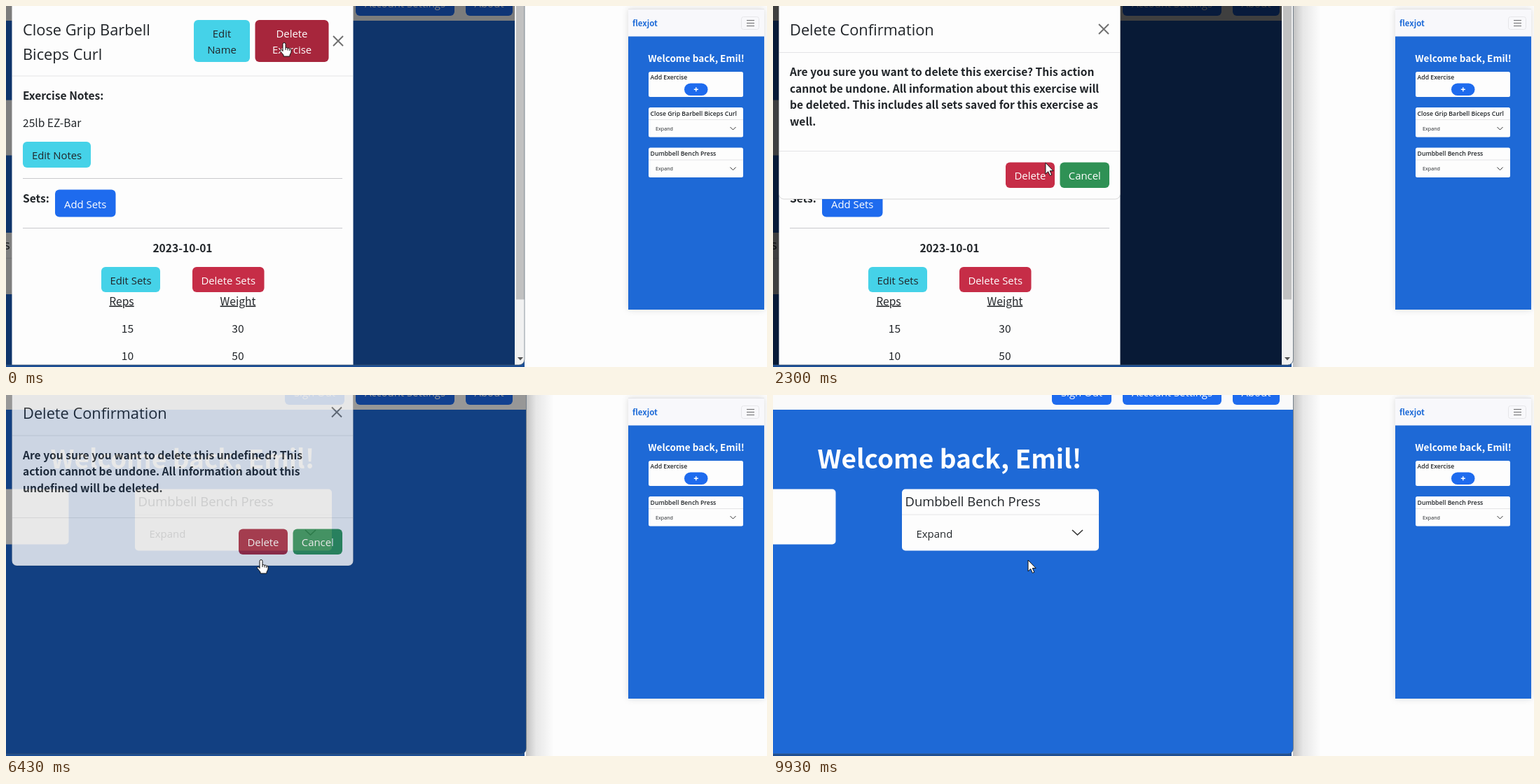
Recreate the animation shown at these times as an HTML page. Size 1086 by 516 pixels, loop 9.96 s.

```html
<!DOCTYPE html>
<html lang="en">
<head>
<meta charset="utf-8">
<title>Delete exercise</title>
<style>
  html, body { margin: 0; width: 100%; height: 100%; overflow: hidden; background: #fdfdfd; }
  svg { display: block; width: 1086px; height: 516px; }
  text { font: 15.6px "Noto Sans CJK JP", "Noto Sans CJK SC", "Noto Sans CJK", sans-serif; fill: #212529; white-space: pre; }
  .bold { font-weight: 700; }
  .mid { text-anchor: middle; }
  .ui { font: 14.9px "Open Sans", "Noto Sans", sans-serif; }
  .title { font: 500 21.8px "Open Sans", "Noto Sans", sans-serif; }
  .card { font: 500 18.4px "Open Sans", "Noto Sans", sans-serif; }
  .tiny { font: 600 8.7px "Open Sans", "Noto Sans", sans-serif; }
  .mini { font: 7.2px "Open Sans", "Noto Sans", sans-serif; }
  .hero { font-size: 37px; }
  .white { fill: #fff; }
  .under { text-decoration: underline; }
  .line { stroke: #e4e4e6; }
  .rule { stroke: #c9c9cd; }
  .stroke { fill: none; stroke: #333; }
</style>
</head>
<body>
<svg id="stage" viewBox="0 0 1086 516"></svg>
<script>
const BLUE = '#1e69d6', PRIMARY = '#1e6bee', CYAN = '#45d2e8', GREEN = '#2f9155', PAPER = '#fdfdfd';
const RED = [198, 45, 71], RED_HOVER = [167, 38, 60];
const rgb = c => `rgb(${c})`;

// Markup helpers
const rect = (x, y, w, h, fill, r = 0, extra = '') =>
  `<rect x="${x}" y="${y}" width="${w}" height="${h}" fill="${fill}" rx="${r}" ${extra}/>`;
const text = (x, y, label, cls = '') => `<text x="${x}" y="${y}" class="${cls}">${label}</text>`;
const hline = (x1, x2, y, cls = 'line') => `<path d="M${x1} ${y}H${x2}" class="${cls}"/>`;
const cross = (x, y) => `<path d="M${x - 7} ${y - 7}l14 14m0-14l-14 14" class="stroke" stroke-width="1.9" opacity=".7"/>`;
const group = (id, content, extra = '') => `<g id="${id}" ${extra}>${content}</g>`;

function button(x, y, w, h, fill, label, id = '') {
  const lines = label.split('|');
  const first = y + h / 2 + 6.5 - (lines.length - 1) * 11.7;
  return rect(x, y, w, h, fill, 6, id && `id="${id}"`) + lines.map((line, i) =>
    text(x + w / 2, first + i * 23.4, line, 'ui mid' + (fill === CYAN ? '' : ' white'))).join('');
}

const exerciseCard = (x, y) =>
  rect(x, y, 281, 88, PAPER, 5) + text(x + 4.5, y + 24, 'Dumbbell Bench Press', 'card') +
  hline(x, x + 281, y + 36.5) + text(x + 20.5, y + 69, 'Expand', 'ui') +
  `<path d="M${x + 243} ${y + 58.5}l7.5 7 7.5-7" class="stroke" stroke-width="1.6"/>`;

const phoneCard = (y, name) =>
  rect(917, y, 135, 42.5, PAPER, 2.5) + text(919.5, y + 11.7, name, 'tiny') +
  hline(917, 1052, y + 17.5) + text(927, y + 32.7, 'Expand', 'mini') +
  `<path d="M1033.5 ${y + 28}l4 4 4-4" class="stroke"/>`;

const paragraph = lines => lines.map((line, i) => text(24, 100 + i * 23.5, line, 'bold')).join('');

const page =
  rect(0, 0, 742, 513, BLUE) + rect(0, 0, 742, 21, '#fafafa') +
  button(398, -23, 85, 37, PRIMARY, 'Sign Out') +
  button(499, -23, 141, 37, PRIMARY, 'Account Settings') +
  button(656, -23, 67, 37, PRIMARY, 'About') +
  text(252, 105, 'Welcome back, Emil!', 'hero bold mid white') +
  rect(-192, 134.5, 281.5, 79, PAPER, 5) +
  group('cardBefore', exerciseCard(-192, 324)) +
  group('cardAfter', exerciseCard(184, 134.5));

const exerciseModal =
  rect(8.5, -10, 487, 530, PAPER) +
  text(24, 42, 'Close Grip Barbell', 'title') + text(24, 76.5, 'Biceps Curl', 'title') +
  button(268, 20, 80, 60, CYAN, 'Edit|Name') +
  button(355.5, 20, 105, 60, rgb(RED), 'Delete|Exercise', 'deleteExercise') +
  cross(474, 50) + hline(9, 495, 100) +
  text(24, 134, 'Exercise Notes:', 'bold') + text(24, 173, '25lb EZ-Bar') +
  button(24, 194, 97, 37, CYAN, 'Edit Notes') + hline(24, 480, 246.5, 'rule') +
  text(24, 281, 'Sets:', 'bold') + button(70, 262.5, 86.5, 39, PRIMARY, 'Add Sets') +
  hline(24, 480, 317.5, 'rule') + text(252, 352, '2023-10-01', 'bold mid') +
  button(136, 373, 84, 36, CYAN, 'Edit Sets') +
  button(266, 373, 102.5, 36, rgb(RED), 'Delete Sets') +
  text(165, 427.5, 'Reps', 'mid under') + text(331, 427.5, 'Weight', 'mid under') +
  text(173.5, 467, '15', 'mid') + text(331, 467, '30', 'mid') +
  text(173.5, 506, '10', 'mid') + text(331, 506, '50', 'mid');

const confirmModal =
  rect(8.5, -60, 487, 336, PAPER, 7, 'id="sheet" stroke="#000" stroke-opacity=".15"') +
  text(24, 42, 'Delete Confirmation', 'title') + cross(472, 33) + hline(9, 495, 66.5) +
  group('question', paragraph([
    'Are you sure you want to delete this exercise? This action',
    'cannot be undone. All information about this exercise will',
    'be deleted. This includes all sets saved for this exercise as',
    'well.'])) +
  group('emptyQuestion', paragraph([
    'Are you sure you want to delete this undefined? This',
    'action cannot be undone. All information about this',
    'undefined will be deleted.'])) +
  group('footer', hline(9, 495, 207.5) +
    button(332, 223.5, 70, 36.5, rgb(RED), 'Delete', 'deleteConfirm') +
    button(409.5, 223.5, 70.5, 36.5, GREEN, 'Cancel'));

const scrollbar =
  rect(726, 0, 16, 513, '#f1f1f1') + rect(728, 0, 12, 419.5, '#c1c1c1') +
  '<path d="M730 502h8l-4 4.5z" fill="#555"/>';

const phone =
  rect(888, 4, 194, 430, BLUE, 0, 'style="filter:drop-shadow(0 0 5px #0002)"') +
  rect(888, 4, 194, 39.5, '#f8f8fb') + hline(888, 1082, 4.5) +
  '<text x="894" y="29" class="bold" style="font-size:11.4px;fill:#1e6bd8">flexjot</text>' +
  rect(1049.5, 15.5, 25, 18, 'none', 3, 'stroke="#e6e6e9"') +
  '<path d="M1057 20.5h11m-11 4h11m-11 4h11" class="stroke" opacity=".7"/>' +
  '<text x="985" y="79.5" class="bold mid white" style="font-size:13.5px">Welcome back, Emil!</text>' +
  rect(917, 94, 135, 36, PAPER, 2.5) + text(919.5, 105, 'Add Exercise', 'tiny') +
  rect(968, 110.5, 33.5, 17.5, PRIMARY, 8.75) +
  '<path d="M981.8 119.3h6m-3-3v6" stroke="#fff" stroke-width="1.4"/>' +
  group('phoneBefore', phoneCard(145, 'Close Grip Barbell Biceps Curl') + phoneCard(202.5, 'Dumbbell Bench Press')) +
  group('phoneAfter', phoneCard(145, 'Dumbbell Bench Press'));

const pointers =
  group('arrow', '<path d="M0 0V16L3.7 12.6 6.4 18.4 8.9 17.3 6.3 11.6H11.2Z"/>', 'fill="#fff" stroke="#111"') +
  group('hand', '<path d="M-2 1.5Q-2-.5 0-.5T2 1.5V7Q3.5 5.8 5 7.4 6.5 6.6 7.6 8.2 10 7.6 10 10V13L8 17V19H-1V17L-5.5 11.5Q-6 9.5-4 9.5L-2 11.5Z"/><path d="M2 7v3m3-2.5v3m2.7-2v2.5"/>',
    'fill="#fff" stroke="#111"') +
  group('beam', '<path d="M-3.5-8H-1L0-7 1-8H3.5M0-7V7M-3.5 8H-1L0 7 1 8H3.5" fill="none" stroke="#222" stroke-width="1.4"/>');

stage.innerHTML = `
  <defs>
    <linearGradient id="fade">
      <stop stop-opacity=".24"/><stop offset=".35" stop-opacity=".09"/><stop offset="1" stop-opacity="0"/>
    </linearGradient>
    <clipPath id="frame"><rect id="frameShape" x="-20" y="-20" height="533" rx="8"/></clipPath>
  </defs>
  ${rect(0, 0, 1086, 516, PAPER)}
  ${rect(0, 505, 740, 11, '#1c4e94')}
  ${rect(742, 0, 40, 516, 'url(#fade)', 0, 'id="shadow"')}
  <g clip-path="url(#frame)">
    ${page}
    ${rect(0, 0, 742, 513, '#000', 0, 'id="backdrop"')}
    ${group('exerciseModal', exerciseModal)}
    ${group('confirmModal', confirmModal)}
    ${group('scrollbar', scrollbar)}
  </g>
  <rect id="frameEdge" x="-20" y="-20" height="533" rx="8" fill="none" stroke="#456" stroke-opacity=".6"/>
  ${phone}
  ${pointers}`;

const $ = id => document.getElementById(id);
const show = (id, on) => $(id).setAttribute('display', on ? 'inline' : 'none');
const set = (id, name, value) => $(id).setAttribute(name, value);
const progress = (t, start, length) => Math.min(1, Math.max(0, (t - start) / length));
const easeOut = x => 1 - (1 - x) ** 1.7;
const mix = (a, b, k) => rgb(a.map((v, i) => Math.round(v + (b[i] - v) * k)));

const DURATION = 9960, FOCUS = 600, OPEN = 700, HOVER = 2340, CLOSE = 6400;
const PATH = [[0, 397, 53], [690, 397, 53], [760, 400, 53], [1500, 400, 53], [2300, 389, 224], [2600, 364, 236], [DURATION, 364, 236]];

function pointerAt(t) {
  const i = PATH.findIndex(p => p[0] > t);
  const [t0, x0, y0] = PATH[i - 1], [t1, x1, y1] = PATH[i];
  const k = (t - t0) / (t1 - t0);
  return [x0 + (x1 - x0) * k, y0 + (y1 - y0) * k];
}

function pointerKind(t, y) {
  if (t < OPEN || (t >= HOVER && t < CLOSE + 120)) return 'hand';
  const overText = t < 900 || (y > 83 && y < 177);
  return overText && t < HOVER ? 'beam' : 'arrow';
}

function draw(t) {
  const deleted = t >= CLOSE, focused = t >= FOCUS;
  const opened = progress(t, OPEN, 150), closed = progress(t, CLOSE, 150);
  const opacity = deleted ? 1 - closed : opened;
  const slide = deleted ? -50 * easeOut(progress(t, CLOSE, 300)) : -50 * (1 - easeOut(progress(t, OPEN, 300)));

  for (const id of ['cardBefore', 'phoneBefore', 'exerciseModal', 'question', 'scrollbar']) show(id, !deleted);
  for (const id of ['cardAfter', 'phoneAfter', 'emptyQuestion']) show(id, deleted);
  show('shadow', focused);
  for (const id of ['frameShape', 'frameEdge']) set(id, 'width', focused ? 762.5 : 760);

  set('backdrop', 'opacity', deleted ? .5 * (1 - closed) : 1 - .5 * (1 - .5 * opened));
  set('confirmModal', 'opacity', opacity);
  set('confirmModal', 'transform', `translate(0 ${slide})`);
  set('sheet', 'height', deleted ? 312.5 : 336);
  set('footer', 'transform', `translate(0 ${deleted ? -23.5 : 0})`);
  set('deleteExercise', 'fill', mix(RED_HOVER, RED, opened));
  set('deleteConfirm', 'fill', mix(RED, RED_HOVER, progress(t, HOVER, 150)));

  const [x, y] = pointerAt(t), kind = pointerKind(t, y);
  for (const id of ['arrow', 'hand', 'beam']) show(id, id === kind);
  set(kind, 'transform', `translate(${x} ${y})`);
}

const start = performance.now();
function tick() {
  draw((performance.now() - start) % DURATION);
  requestAnimationFrame(tick);
}
tick();
</script>
</body>
</html>
```
